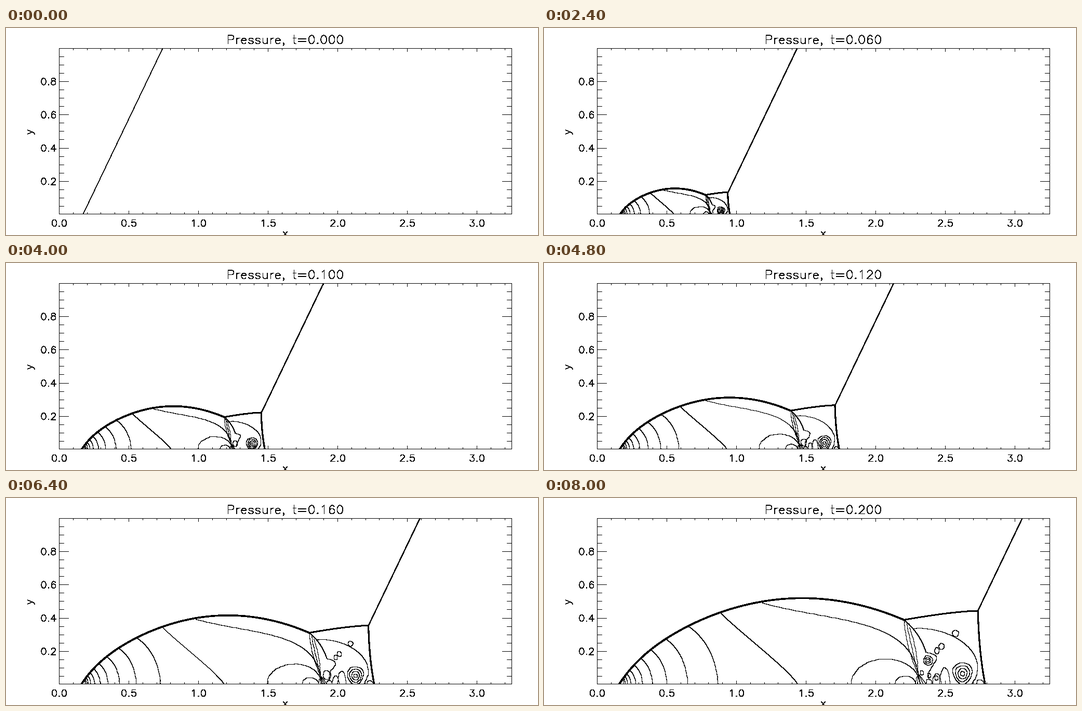
A matplotlib script for the animation above (8.4 s loop, 1024 by 400 pixels).

```python
import numpy as np
import matplotlib.pyplot as plt
from matplotlib.animation import FuncAnimation
from matplotlib.collections import LineCollection
from matplotlib.patches import Rectangle

W, H, DPI = 1024, 400, 100
FRAMES, STEP = 21, 400
PX = 72 / DPI
HAIR = 0.05     # unsmoothed strokes fill every touched pixel, so this is 1 px
LEFT, RIGHT, TOP, BASE = 102, 973, 39, 359
FOOT = np.array([146.7, 359.5])     # the flow grows self-similarly from here


def arc(cx, cy, rx, ry, a0=0, a1=360, n=24):
    a = np.radians(np.linspace(a0, a1, n))
    return list(zip(cx + rx * np.cos(a), cy + ry * np.sin(a)))


def bezier(*points, n=60):
    """Curve of any degree, by repeated interpolation."""
    t = np.linspace(0, 1, n)[:, None]
    p = [np.array(q, float) for q in points]
    while len(p) > 1:
        p = [(1 - t) * a + t * b for a, b in zip(p, p[1:])]
    return p[0]


# ---- stroke lettering -------------------------------------------------
SIX = [arc(10.5, 6.5, 6.5, 6.5),
       [(16, 18)] + arc(11, 10, 7, 11, 65, 200)]
GLYPHS = {  # advance width, strokes
    "0": (20, [arc(10, 10.5, 7, 10.5)]),
    "1": (20, [[(6, 17), (8, 18), (11, 21), (11, 0)]]),
    "2": (20, [arc(10, 15, 6, 6, 170, -32) + [(3, 0), (17, 0)]]),
    "3": (20, [[(5, 21), (16, 21), (10, 13)] + arc(10, 6.5, 7, 6.5, 80, -160)]),
    "4": (20, [[(13, 0), (13, 21), (3, 7), (18, 7)]]),
    "5": (20, [[(15, 21), (5, 21), (4, 12)] + arc(10, 7, 7, 7, 130, -155)]),
    "6": (20, SIX),
    "7": (20, [[(3, 21), (17, 21), (7, 0)]]),
    "8": (20, [arc(10, 16.7, 6, 4.3), arc(10, 6.2, 7, 6.2)]),
    "9": (20, [[(20 - x, 21 - y) for x, y in s] for s in SIX]),
    ".": (10, [arc(5, 1, 1, 1, n=5)]),
    ",": (10, [[(5, 2), (4, 1), (5, 0), (6, 1), (6, -1), (4, -4)]]),
    "=": (26, [[(4, 12), (22, 12)], [(4, 6), (22, 6)]]),
    " ": (16, []),
    "P": (21, [[(4, 0), (4, 21)] + arc(12.5, 15.5, 5.5, 5.5, 90, -90) + [(4, 10)]]),
    "r": (13, [[(4, 14), (4, 0)], arc(10, 8, 6, 6, 180, 90) + [(12, 14)]]),
    "e": (18, [[(3, 8)] + arc(9, 7, 6, 7, 8, 318)]),
    "s": (17, [arc(8.5, 10.7, 5.4, 3.3, 15, 250) + arc(8.5, 3.7, 5.5, 3.7, 70, -170)]),
    "u": (19, [[(4, 14)] + arc(9, 5, 5, 5, 180, 310) + [(15, 4)], [(15, 14), (15, 0)]]),
    "t": (12, [[(5, 21)] + arc(8.5, 3.5, 3.5, 3.5, 180, 270) + [(10, 0)],
               [(2, 14), (9, 14)]]),
    "x": (17, [[(3, 14), (14, 0)], [(14, 14), (3, 0)]]),
    "y": (16, [[(2, 14), (8, 0)], [(14, 14), (8, 0), (6, -4), (4, -6), (1, -7)]]),
}


def lettering(text, x, y, size, align=0.5, upright=True):
    """Strokes of a line of text on baseline y, aligned at x."""
    pen = -align * sum(GLYPHS[c][0] for c in text)
    out = []
    for c in text:
        width, strokes = GLYPHS[c]
        for s in strokes:
            p = (np.array(s, float) + (pen, 0)) * size
            if upright:
                out.append(np.column_stack([x + p[:, 0], y - p[:, 1]]))
            else:
                out.append(np.column_stack([x - p[:, 1], y - p[:, 0]]))
        pen += width
    return out


# ---- axes -------------------------------------------------------------
def to_x(v):
    return 102 + 268 * v


def to_y(v):
    return 360 - 321.2 * v


def axis_lines():
    out = [[(LEFT, TOP), (RIGHT, TOP), (RIGHT, BASE), (LEFT, BASE), (LEFT, TOP)]]
    for n in range(33):
        x, size = round(to_x(n / 10)), 3 if n % 5 else 6
        out += [[(x, BASE), (x, BASE - size)], [(x, TOP), (x, TOP + size)]]
    for n in range(1, 20):
        y, size = round(to_y(n / 20)), 9 if n % 4 else 18
        out += [[(LEFT, y), (LEFT + size, y)], [(RIGHT, y), (RIGHT - size, y)]]
    return out


def axis_text():
    size = 0.625
    out = lettering("x", 537, 402, size)
    out += lettering("y", 50, 200.5, size, upright=False)
    for n in range(7):
        out += lettering(f"{n / 2:.1f}", to_x(n / 2), 383, size)
    for n in range(1, 5):
        out += lettering(f"{n / 5:.1f}", 97, to_y(n / 5) + 6.5, size, align=1)
    return out


# ---- flow field, in units of the last picture -------------------------
KINK, TRIPLE, FOCUS = (546, 124.5), (688, 142), (573, 20)


def bow_height(u):
    return 166.5 - 0.0011 * (u - 350)**2 - 29.7 * np.exp(-(u + 2.7) / 38)


def fan():
    """Rarefaction arcs near the foot, in geometric progression."""
    for n in range(10):
        end, start = 188 * 0.69**n, 130 * 0.67**n
        top = bow_height(start)
        yield bezier((start, top), (0.97 * end, 0.68 * top), (end, 0))


U = np.linspace(-2.7, KINK[0], 120)
BOW = np.column_stack([U, bow_height(U)])
ROOF = bezier(KINK, (640, 141), TRIPLE)
STEM = bezier(TRIPLE, (690, 60), (702, 0))
INNER_SHOCK = bezier(KINK, (577, 98), (588, 62))
FAN = list(fan())
FLANK = bezier((273, 157), (400, 121), (555, 130), FOCUS)
SWEEP = bezier((191, 139), (230, 100), (328, 25), (341, 0))
ARCH = arc(510, 0, 66, 49, 180, 0, 60)
LOBE = arc(548, 0, 20, 16, 180, 0)
SHEETS = [bezier((546 + 5 * n, 124 - 7 * n), (549 + 11 * n, 72), FOCUS)
          for n in range(3)]
RAYS = [bezier(FOCUS, (569 + 3 * n, 12), (568 + 5 * n, 0)) for n in range(5)]
RIM = bezier((563, 108), (650, 112), (715, 50), (676, 0))
SLIP = bezier((588, 62), (635, 52), (585, 38), (594, 8))


def pixel_path(p):
    """Step along a path from pixel to neighbouring pixel."""
    p = np.array(p, float)
    d = np.abs(np.diff(p, axis=0)).max(axis=1)
    s = np.concatenate([[0], np.cumsum(d)])
    at = np.arange(0, s[-1] + 1)
    return np.round(np.column_stack([np.interp(at, s, p[:, 0]),
                                     np.interp(at, s, p[:, 1])]))


def wobble(p, size=0.6):
    """Slight raggedness along a contour."""
    s = np.concatenate([[0], np.cumsum(np.hypot(*np.diff(p, axis=0).T))])
    return p + (size * np.sin(s / 2.1) * np.sin(s / 5.3 + 1))[:, None]


def vortex(k):
    """Nested rings, pinched towards the wall."""
    cx, grow = 658.3 - 6 * (1 - k) / k, k**-0.2
    for n in range(4):
        rx, ry = (4 + 4.7 * n) * grow, (4.5 + 5.5 * n) * grow
        if rx * k > 1.5:
            x, y = np.array(arc(0, 0, 1, 1, n=40)).T
            yield np.column_stack([cx + rx * x * (1 + 0.08 * n * y), 20.5 + ry * y])


def eddies(k):
    """Small closed contours that shed from the slip line."""
    if k > 0.7:
        for n in range(3):
            yield arc(609 + 9 * n**2, 65 + 8.3 * n**2, 4 + n, 6)
    if k > 0.85:
        for n in range(3):
            yield arc(580 + 14 * n, 22 - 5 * n, 3, 4.5)
    elif k > 0.4:
        yield arc(588, 22, 9, 11)
    if k > 0.93:
        for r in (3, 5.5, 9):
            yield arc(592, 46, r, r)
    if k > 0.5:
        for n in range(3):
            yield arc(594 + 15 * n, 0, 6 + 2 * n, 10 + 11 * n, 0, 180)
        yield arc(692, 0, 7, 9, 0, 180)


def contours(k):
    yield from (p for p in FAN if p[-1, 0] * k > 4)
    yield from [FLANK, SWEEP, *SHEETS, *RAYS]
    if k > 0.12:
        yield from [ARCH, RIM]
    if k > 0.25:
        yield from [LOBE, SLIP]
    yield from vortex(k)
    yield from eddies(k)


def field(i):
    """Segments and widths of every line at step i."""
    k = i / (FRAMES - 1)

    def place(p):
        return FOOT + np.array(p, float) * (k, -k)

    def front(y):
        return 148 + 30.95 * i + (BASE - y) * 0.478

    low = FOOT[1] - TRIPLE[1] * k
    segs = [[(front(low), low), (front(TOP - 1), TOP - 1)]]
    widths = [1.2 if i else 0.5]
    if i:
        shocks = [(BOW, 2.6), (ROOF, 2), (STEM, 2.2), (INNER_SHOCK, 0.9)]
        thin = [pixel_path(wobble(place(p))) for p in contours(k)]
        segs += [place(p) for p, _ in shocks] + thin
        widths += [w for _, w in shocks] + [HAIR] * len(thin)
    return segs, np.array(widths) * PX


# ---- stage ------------------------------------------------------------
fig = plt.figure(figsize=(W / DPI, H / DPI), dpi=DPI, facecolor="white")
ax = fig.add_axes([0, 0, 1, 1])
ax.set_xlim(-0.5, W - 0.5)
ax.set_ylim(H - 0.5, -0.5)
ax.axis("off")


def strokes(segments, width):
    lines = LineCollection(segments, colors="black", linewidths=width * PX,
                           antialiaseds=False, capstyle="projecting",
                           joinstyle="round", snap=False)
    ax.add_collection(lines, autolim=False)
    return lines


strokes(axis_lines(), HAIR)
strokes(axis_text(), 0.6)
title = strokes([], 0.6)
flow = strokes([], HAIR)
flow.set_clip_path(Rectangle((LEFT - 0.5, TOP - 0.5), RIGHT - LEFT + 1,
                             BASE - TOP + 1, transform=ax.transData))


def update(i):
    title.set_segments(lettering(f"Pressure, t={i / 100:.3f}", 537, 30, 0.78))
    segs, widths = field(i)
    flow.set_segments(segs)
    flow.set_linewidths(widths)
    return title, flow


anim = FuncAnimation(fig, update, frames=FRAMES, interval=STEP,
                     repeat=True, repeat_delay=0)
plt.show()
```
